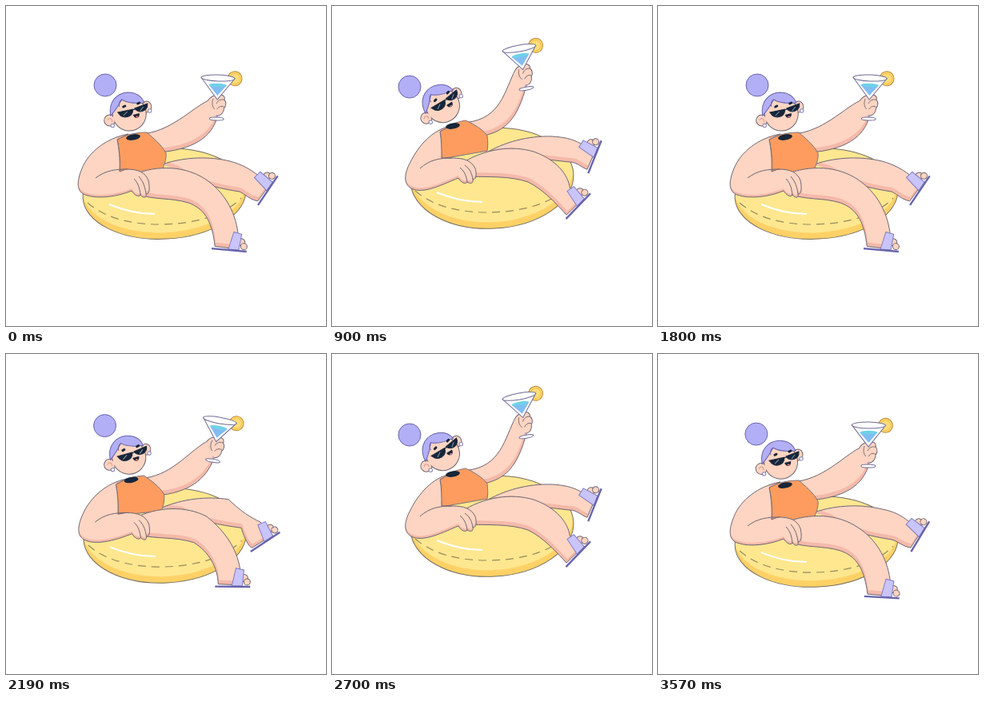
Recreate the animation shown at these times as an HTML page with a canvas. Size 400 px wide and 400 px high, loop 3600 ms.

```html
<!DOCTYPE html>
<html lang="en">
<head>
<meta charset="utf-8">
<title>Pool float</title>
<style>
html, body { margin: 0; width: 100%; height: 100%; overflow: hidden; background: #fff; }
canvas { display: block; width: 400px; height: 400px; }
</style>
</head>
<body>
<canvas id="stage" width="400" height="400"></canvas>
<script>
const ctx = document.getElementById('stage').getContext('2d');
const PERIOD = 1800, RAD = Math.PI / 180;
const SKIN = '#fed5c2', BLUSH = '#f4b9a9', LINE = '#6d6673', NAVY = '#16263a';
const LILAC = '#b3aff6', INDIGO = '#6864ac', YELLOW = '#fee78f', AMBER = '#ffd166';
let cos, sin;

// One harmonic around a mean: at rest, a + b; half a period later, a - b.
const wave = (a, b, c = 0) => a + b * cos + c * sin;
// 0 at the low pose, 1 at the high pose; lag delays trailing limbs.
const lift = (lag = 0) => 0.5 - 0.5 * cos - lag * sin;

function mix([low, high], k) {
  const ends = high.match(/-?[\d.]+/g);
  let i = 0;
  return low.replace(/-?[\d.]+/g, n => (+n + (ends[i++] - n) * k).toFixed(2));
}

function shape(path, fill, stroke = LINE, width = 1) {
  const p = new Path2D(path);
  if (fill) { ctx.fillStyle = fill; ctx.fill(p); }
  if (stroke) { ctx.strokeStyle = stroke; ctx.lineWidth = width; ctx.stroke(p); }
}

// Fills with the shade, then with the light colour moved up inside the outline.
function shaded(path, light, shade, dx, dy, stroke = LINE) {
  shape(path, shade, null);
  ctx.save();
  ctx.clip(new Path2D(path));
  ctx.translate(dx, dy);
  shape(path, light, null);
  ctx.restore();
  shape(path, null, stroke);
}

function oval(x, y, rx, ry, fill, stroke = LINE, width = 1, tilt = 0) {
  ctx.beginPath();
  ctx.ellipse(x, y, rx, ry, tilt * RAD, 0, 2 * Math.PI);
  if (fill) { ctx.fillStyle = fill; ctx.fill(); }
  if (stroke) { ctx.strokeStyle = stroke; ctx.lineWidth = width; ctx.stroke(); }
}

function placed(pose, draw) {
  ctx.save();
  ctx.translate(pose.x, pose.y);
  ctx.rotate(pose.turn * RAD);
  draw();
  ctx.restore();
}

// Stage coordinates of a point given in a part's own frame.
function at({ x, y, turn }, px, py) {
  const c = Math.cos(turn * RAD), s = Math.sin(turn * RAD);
  return `${(x + px * c - py * s).toFixed(2)},${(y + px * s + py * c).toFixed(2)}`;
}

function drawRing() {
  const x = wave(199, -1), y = wave(225, 9.7), ry = wave(59.7, -3.2);
  ctx.save();
  ctx.translate(x, y);
  ctx.rotate(-3 * RAD);
  shaded(`M-102,0A102,${ry} 0 0 1 102,0A102,${ry} 0 0 1 -102,0Z`, YELLOW, AMBER, 0, -8, '#77705f');
  ctx.restore();

  ctx.save();
  ctx.translate(wave(1, -1), wave(-7.5, 7.5, -1));
  ctx.setLineDash([10, 7]);
  shape('M102,246C125,266 158,273 192,273C232,273 272,263 294,240', null, '#988a5e', 1.2);
  ctx.setLineDash([]);
  shape('M129,248C146,255 165,260 186,260', null, '#fff', 2);
  ctx.restore();
}

function drawFoot(pose) {
  placed(pose, () => {
    oval(14, -10, 5, 4.5, SKIN);
    oval(18, -5, 4, 4, SKIN);
    shape('M4,-22L14,-20L12,0L-1,0Z', '#c9c5fb', '#827dc4');
    shape('M-22,1L22,1', null, INDIGO, 2.4);
  });
}

// The thigh follows the body; shin and calf trail with the foot.
function drawLeg(pose, lag, { thigh, shin, calf, under }) {
  const body = lift(), trail = lift(lag);
  const foot = `${at(pose, 9, -22)}L${at(pose, 12, -1)}L${at(pose, -18, -2)}`;
  shaded(`${mix(thigh, body)}${mix(shin, trail)} ${foot}${mix(calf, trail)} ${mix(under, body)}`,
    SKIN, BLUSH, 1, -5);
  drawFoot(pose);
}

function drawFarLeg() {
  const pose = { x: wave(327, -0.5, -3.4), y: wave(209.2, 20.8, 21), turn: wave(-62, 6, 28) };
  drawLeg(pose, 0.4, {
    thigh: ['M195,198C225,188 255,188 280,194', 'M190,185C215,170 245,162 275,163'],
    shin: ['C295,198 305,204', 'C290,164 300,166'],
    calf: ['C305,242 300,236', 'C312,202 306,195'],
    under: ['292,232C265,228 240,222 215,205', '297,195C270,192 245,190 225,182']
  });
}

function drawNearLeg() {
  const pose = { x: wave(293, -14, -7), y: wave(276.8, 27.2, 7.6), turn: wave(-20.5, 25.5, 16) };
  drawLeg(pose, 0.14, {
    thigh: ['M158,211C190,198 225,200 250,217', 'M160,198C190,178 225,174 252,182'],
    shin: ['C272,232 286,255', 'C280,192 295,210'],
    calf: ['C258,272 250,254', 'C283,250 264,229'],
    under: ['228,246C205,239 185,243 165,235', '245,220C222,212 195,214 168,213']
  });
}

function drawGlassArm() {
  const pose = { x: wave(249.5, 15.5, 15), y: wave(71.5, 18.5, 8), turn: wave(-4, 6, 13) };
  const k = lift(0.1);
  const upper = mix(['M168,160C205,158 232,128', 'M160,146C208,145 214,112'], k);
  const lower = mix(['C258,165 232,180 190,183', 'C232,140 218,158 184,163'], k);
  placed(pose, () => shape('M0,25L0,51', null, '#8f8cc0', 1.5));
  shaded(`${upper} ${at(pose, -12, 29)}L${at(pose, 1, 47)}${lower}`, SKIN, BLUSH, -1, -5);
  placed(pose, () => {
    shape('M-12,29C-8,23 -4,21 0,22C5,19 10,22 9,27C12,30 11,35 9,37C9,43 5,47 1,47', SKIN);
    shape('M-13,30L-9,34L-1,46L2,46L4,38L-4,28Z', SKIN, null);
    shape('M9,27C4,26 1,28 -1,32M9,36C5,34 2,36 0,39M-5,26C-7,31 -6,36 -3,39', null, LINE, 0.9);
    shape('M0,46L0,51', null, '#a7a3d6', 1.5);
    oval(0, 51, 9, 2, '#fff', '#706c96');
    oval(21, 0, 9, 9, '#ffd564', '#b98a42');
    oval(21, 0, 6.5, 6.5, '#ffdd78', '#f6bd4e', 0.8);
    shape('M-21,0L0,27L21,0Z', '#fff', '#706c96');
    shape('M-11,9L11,9L0,22Z', '#82bdf2', null);
    oval(0, 9, 11, 2.3, '#70d1e8', null);
    oval(0, 0, 21, 4, '#fff', '#706c96');
  });
}

function drawTorso() {
  shape(mix([
    'M139,167C150,160 165,158 176,158C184,165 194,173 200,184C201,192 197,199 195,206L142,209C143,195 142,180 139,167Z',
    'M135,157C145,149 155,145 167,143C178,148 188,154 194,162C195,170 195,176 194,181L137,191C136,178 137,168 135,157Z'
  ], lift()), '#fe9c5f', '#7a7580');
}

function drawNearArm() {
  const k = lift();
  shaded(mix([
    'M153,160C125,165 103,183 95,203C88,220 88,232 99,236C115,242 140,238 157,231C160,236 166,240 168,236C172,241 176,240 175,235C181,236 179,222 178,218C174,208 166,204 150,204L142,207C143,190 141,178 139,167Z',
    'M148,150C125,155 108,175 98,195C90,210 89,222 99,228C115,236 140,222 158,215C160,219 166,224 169,220C174,223 177,221 176,217C182,217 180,206 179,203C174,193 165,190 150,190L137,190C137,178 137,168 135,157Z'
  ], k), SKIN, BLUSH, 0, -3);
  shape(mix([
    'M112,215C125,205 138,204 152,204M160,216C166,222 167,229 168,236M166,213C172,220 174,227 175,235',
    'M110,203C122,192 135,190 150,190M160,202C166,207 168,213 169,220M166,199C173,204 175,210 176,217'
  ], k), null);
  oval(wave(155, 4, 0.7), wave(157, 7, -1), 9, 3.6, NAVY, null, 1, -10);
}

function drawHead() {
  oval(wave(110.5, 13.5, 10.5), wave(100, -1, -10.4), 14, 14, LILAC, INDIGO);
  placed({ x: wave(145.2, 8, 6), y: wave(129, 5, -1.8), turn: wave(-9.5, 9.5, 5) }, () => {
    ctx.translate(-152.5, -134);
    oval(129, 143, 7, 7, SKIN);
    oval(175, 126, 6, 7, SKIN);
    oval(153.5, 135, 21, 21, SKIN);
    oval(129, 143, 6, 6, SKIN, null);
    shape('M126,143C128,139 132,140 132,145', null, '#d59b91');
    shape('M130,137C127,119 138,109 151,108C162,108 169,113 172,121C160,122 150,121 144,117C140,124 137,130 130,137Z', LILAC, INDIGO);
    shape('M144,117C141,119 140,122 141,126', null, INDIGO);
    ctx.lineCap = 'round';
    shape('M146,126L148,125M164,122L166,121', null, NAVY, 3);
    ctx.lineCap = 'butt';
    shape('M139,133L158,129C158,140 145,142 140,134ZM160,128L176,122C177,132 165,135 160,128ZM157,130L161,129', NAVY, NAVY);
    shape('M146,137L151,132M167,131L171,126', null, '#8f9cab');
    shape('M158,136L166,134C167,141 160,142 158,136Z', NAVY, null);
    oval(163, 138.5, 1.6, 1, '#ee7b78', null);
    oval(132.5, 149.5, 2.2, 2.2, '#fff', '#8884b8');
    oval(179, 131, 2.2, 2.2, '#fff', '#8884b8');
  });
}

function frame(now) {
  const angle = 2 * Math.PI * (now % PERIOD) / PERIOD;
  cos = Math.cos(angle);
  sin = Math.sin(angle);
  ctx.clearRect(0, 0, 400, 400);
  drawRing();
  drawGlassArm();
  drawFarLeg();
  drawTorso();
  drawNearLeg();
  drawNearArm();
  drawHead();
}

const start = performance.now();
function loop() {
  frame(performance.now() - start);
  requestAnimationFrame(loop);
}
loop();
</script>
</body>
</html>
```
